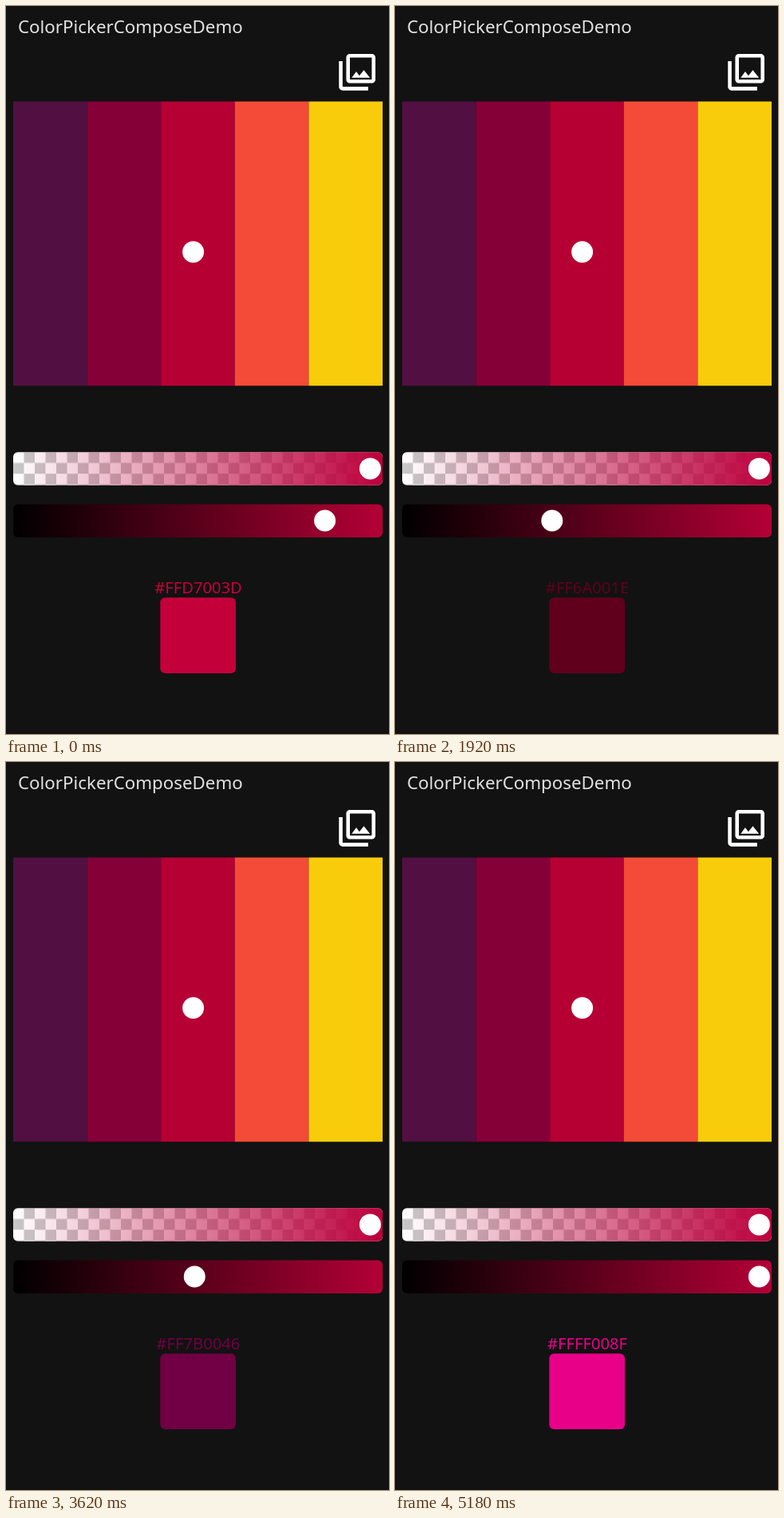
Write an HTML page that moves like this. It is 480 px wide and 911 px high and loops after 5.28 s.

```html
<!DOCTYPE html>
<html lang="en">
<head>
<meta charset="utf-8">
<title>Color picker</title>
<style>
  html, body { margin: 0; height: 100%; overflow: hidden; background: #121212; }
  svg { display: block; width: 100vw; height: 100vh; }
  text { font-family: "Noto Sans", sans-serif; }
</style>
</head>
<body>
<svg viewBox="0 0 480 911">
  <defs>
    <pattern id="checker" x="9" y="558.3" width="27" height="27" patternUnits="userSpaceOnUse">
      <path fill="#fff" d="M0 0h27v27H0z"/>
      <path fill="#c8c8c8" d="M13.5 0H27v13.5H13.5zM0 13.5h13.5V27H0z"/>
    </pattern>
    <linearGradient id="alpha">
      <stop stop-color="#bc003c" stop-opacity="0"/>
      <stop offset="1" stop-color="#bc003c"/>
    </linearGradient>
    <linearGradient id="brightness">
      <stop stop-color="#000"/>
      <stop offset="1" stop-color="#b40036"/>
    </linearGradient>
  </defs>

  <text x="15" y="34" font-size="22.3" fill="#e2e2e2">ColorPickerComposeDemo</text>
  <path fill="#fff" transform="translate(412.7 55.4) scale(2.285)" d="M20 4v12H8V4h12m0-2H8c-1.1 0-2 .9-2 2v12c0 1.1.9 2 2 2h12c1.1 0 2-.9 2-2V4c0-1.1-.9-2-2-2zm-8.5 9.67l1.69 2.26 2.48-3.1L19 15H9zM2 6v14c0 1.1.9 2 2 2h14v-2H4V6H2z"/>

  <g id="stripes"></g>
  <rect x="9" y="558.3" width="463" height="41.5" rx="6" fill="url(#checker)"/>
  <rect x="9" y="558.3" width="463" height="41.5" rx="6" fill="url(#alpha)"/>
  <rect x="9" y="623.5" width="463" height="41.5" rx="6" fill="url(#brightness)"/>
  <g fill="#fff">
    <circle cx="234.6" cy="307.8" r="13.5"/>
    <circle cx="456.4" cy="578.9" r="13.5"/>
    <circle id="knob" cy="644" r="13.5"/>
  </g>

  <g id="result">
    <text id="label" x="241" y="734.5" font-size="20.2" text-anchor="middle"></text>
    <rect x="193.3" y="740.3" width="94.7" height="94.7" rx="6"/>
  </g>
</svg>
<script>
const LOOP = 5280, STEP = 20;
const $ = id => document.getElementById(id);

$('stripes').innerHTML = ['#511041', '#860038', '#b60034', '#f34b37', '#f9cc0b']
  .map((fill, i) => `<rect x="${9 + i * 92.6}" y="119.5" width="92.6" height="355.7" fill="${fill}"/>`)
  .join('');

// time, knob x, red, blue
const keys = [
  [0, 399.6, 215, 61], [960, 399.6, 215, 61], [1440, 349, 188, 57],
  [1920, 196.8, 106, 30], [2560, 36.5, 16, 4], [2660, 25.5, 0, 0],
  [2960, 25.5, 0, 0], [3100, 38, 13, 7], [3620, 236.3, 123, 70],
  [4180, 369.7, 196, 108], [4640, 456.4, 255, 143], [LOOP, 456.4, 255, 143]
];

const slope = (i, c) => (keys[i + 1][c] - keys[i][c]) / (keys[i + 1][0] - keys[i][0]);

// Harmonic mean keeps the curve monotone between keys.
function tangent(i, c) {
  if (i === 0 || i === keys.length - 1) return 0;
  const a = slope(i - 1, c), b = slope(i, c);
  return a * b > 0 ? 2 * a * b / (a + b) : 0;
}

function valueAt(t, c) {
  const i = keys.findIndex((key, n) => n < keys.length - 1 && t < keys[n + 1][0]);
  const span = keys[i + 1][0] - keys[i][0], u = (t - keys[i][0]) / span, v = 1 - u;
  return v * v * (1 + 2 * u) * keys[i][c] + u * u * (3 - 2 * u) * keys[i + 1][c]
    + span * u * v * (v * tangent(i, c) - u * tangent(i + 1, c));
}

const hex = n => n.toString(16).toUpperCase().padStart(2, '0');

function draw(now) {
  const t = Math.floor(now % LOOP / STEP) * STEP;
  const red = Math.round(valueAt(t, 2)), blue = Math.round(valueAt(t, 3));
  $('knob').setAttribute('cx', valueAt(t, 1));
  $('label').textContent = `#FF${hex(red)}00${hex(blue)}`;
  $('result').setAttribute('fill', `rgb(${red * 0.91}, 0, ${blue * 0.96})`);
}

const start = performance.now();
function tick() {
  draw(performance.now() - start);
  requestAnimationFrame(tick);
}
tick();
</script>
</body>
</html>
```
